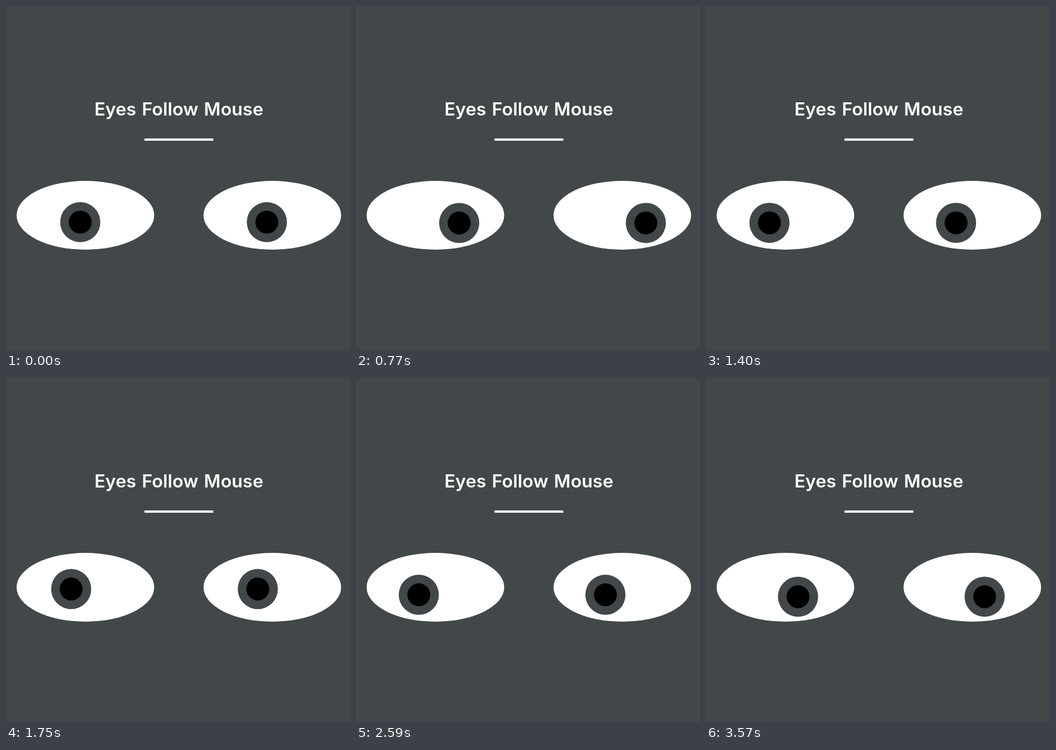
Recreate the animation shown at these times as an HTML page. Size 600x600 px, loop 3990 ms.

```html
<!DOCTYPE html>
<html lang="en">
<head>
<meta charset="utf-8">
<title>Eyes Follow Mouse</title>
<style>
  html, body { margin: 0; width: 100%; height: 100%; overflow: hidden; background: #424749; }
  svg { display: block; width: 100%; height: 100%; }
  text { font: 600 31.5px Inter, "Noto Sans", sans-serif; word-spacing: 2px; text-anchor: middle; }
</style>
</head>
<body>
<svg viewBox="0 0 600 600">
  <defs>
    <g id="iris">
      <circle r="35" fill="#424749"/>
      <circle r="20" fill="#000"/>
    </g>
  </defs>
  <g fill="#fff">
    <text x="301.5" y="191">Eyes Follow Mouse</text>
    <rect x="241.5" y="231" width="120" height="4"/>
    <ellipse cx="138.5" cy="365" rx="120" ry="60"/>
    <ellipse cx="464.5" cy="365" rx="120" ry="60"/>
  </g>
  <g id="gaze">
    <use href="#iris"/>
    <use href="#iris" x="325.5"/>
  </g>
</svg>
<script>
  const STEP = 70, LOOP = 3990, END = 51;
  const gaze = document.getElementById('gaze');

  // The mouse circles: each axis swings between turning points [step, position].
  const turnsX = [[0, 129.5], [2.5, 101.5], [13, 187.5], [22, 100.5], [32.5, 170.5], [38.6, 97.9], [48.5, 170], [END, 160.5]];
  const turnsY = [[0, 377], [2, 383], [7, 356.5], [12.5, 383], [15, 380], [20, 378.2], [28.5, 362.3], [36, 379], [43, 361], [END, 381.4]];

  function swing(turns, step) {
    const i = Math.max(1, turns.findIndex(([at]) => at >= step));
    const [t0, from] = turns[i - 1], [t1, to] = turns[i];
    const ease = (1 - Math.cos(Math.PI * (step - t0) / (t1 - t0))) / 2;
    return from + (to - from) * ease;
  }

  function draw(ms) {
    const step = Math.min(Math.floor((ms % LOOP) / STEP), END);
    gaze.setAttribute('transform', `translate(${swing(turnsX, step)} ${swing(turnsY, step)})`);
  }

  const start = performance.now();
  function tick() {
    draw(performance.now() - start);
    requestAnimationFrame(tick);
  }
  tick();
</script>
</body>
</html>
```
